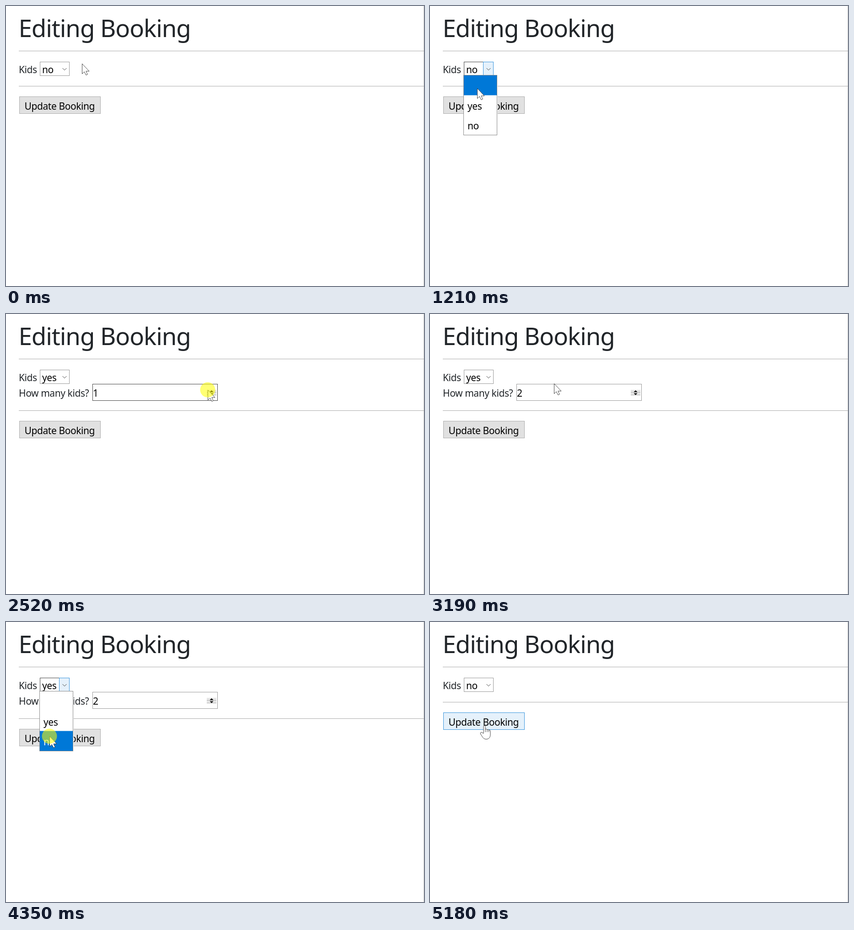
An HTML page with a canvas that plays this animation: 914x613 px, repeating every 6180 ms.

```html
<!DOCTYPE html>
<html lang="en">
<head>
<meta charset="utf-8">
<title>Editing Booking</title>
<style>
  html, body { margin: 0; width: 100%; height: 100%; overflow: hidden; background: #fff; }
  canvas { display: block; }
</style>
</head>
<body>
<canvas id="stage" width="914" height="613"></canvas>
<script>
const ctx = document.getElementById('stage').getContext('2d');
const LOOP = 6180;
const FONT = '"Noto Sans", "Open Sans", sans-serif';
const INK = '#212529', BLUE = '#0078d7', PALE = '#e5f1fb';

// Pointer moves: start, time of last step, steps, target x, target y
const MOVES = [
  [80, 390, 5, 109, 134],
  [810, 1390, 8, 100, 201],
  [1790, 2190, 6, 441, 166],
  [3020, 3430, 6, 100, 138],
  [3670, 3670, 1, 95, 205],
  [3756, 4100, 5, 95, 250],
  [4850, 5180, 5, 118, 226]
];
const CLICKS = [[550, 640], [1470, 1550], [2520, 2600], [2770, 2850], [3510, 3590], [4350, 4430]];
const MENUS = [[640, 1550], [3590, 4430]];
const LIT_ROWS = [[640, 2], [976, 0], [1307, 1], [3670, 0], [3756, 1], [4014, 2]];
const VALUES = [[0, ''], [2520, '1'], [2770, '2']];

const within = (t, [a, b]) => t >= a && t < b;
const latest = (list, t) => list.filter(k => k[0] <= t).pop()[1];
const inBox = (p, x, y, w, h) => p.x >= x && p.x <= x + w && p.y >= y && p.y <= y + h;

function pointerAt(t) {
  let x = 166, y = 126;
  for (const [start, end, steps, tx, ty] of MOVES) {
    if (t < start) break;
    const gap = steps > 1 ? (end - start) / (steps - 1) : 1;
    const p = Math.min(steps, Math.floor((t - start) / gap + 1e-6) + 1) / steps;
    const e = p * p * (3 - 2 * p);
    x += (tx - x) * e;
    y += (ty - y) * e;
  }
  return { x: Math.round(x), y: Math.round(y) };
}

function text(str, x, y, color = '#000', size = 21) {
  ctx.font = `${size}px ${FONT}`;
  ctx.letterSpacing = `${-0.02 * size}px`;
  ctx.fillStyle = color;
  ctx.fillText(str, x, y);
}

function rect(x, y, w, h, fill) {
  ctx.fillStyle = fill;
  ctx.fillRect(x, y, w, h);
}

function box(x, y, w, h, fill, border) {
  rect(x, y, w, h, fill);
  ctx.strokeStyle = border;
  ctx.lineWidth = 1;
  ctx.strokeRect(x + 0.5, y + 0.5, w - 1, h - 1);
}

function poly(points) {
  ctx.beginPath();
  points.forEach(([x, y]) => ctx.lineTo(x, y));
}

function rule(y) {
  rect(28, y, 886, 1, '#aaa');
}

function select(value, active) {
  box(74, 122, 65, 31, '#fff', active ? '#444' : '#999');
  if (active) box(116, 122, 23, 31, PALE, '#3a96dd');
  text(value, 79, 147);
  poly([[123.5, 136], [128, 140.5], [132.5, 136]]);
  ctx.strokeStyle = '#444';
  ctx.lineWidth = 1;
  ctx.stroke();
}

function numberField(value, active) {
  text('How many kids?', 28, 181, INK);
  box(189, 153, 274, 37, '#fff', active ? '#444' : '#999');
  text(value, 190, 181);
  rect(439, 166, 21, 12, '#e6e6e6');
  rect(439, 171, 21, 1, '#b0b0b0');
  rect(439, 177, 21, 1, '#b0b0b0');
  ctx.fillStyle = '#000';
  poly([[445.5, 171], [449.5, 167], [453.5, 171]]);
  ctx.fill();
  poly([[445.5, 173.5], [449.5, 177.5], [453.5, 173.5]]);
  ctx.fill();
}

function menu(lit) {
  rect(73, 151, 75, 132, '#fff');
  rect(73, 152 + lit * 43.3, 74, 43.4, BLUE);
  ctx.strokeStyle = '#8a8a8a';
  ctx.lineWidth = 1;
  ctx.strokeRect(73.5, 151.5, 73, 131);
  ['', 'yes', 'no'].forEach((label, i) =>
    text(label, 82, 184 + i * 43, i === lit ? '#fff' : '#000'));
}

function outline() {
  ctx.fillStyle = '#fff';
  ctx.strokeStyle = '#333';
  ctx.lineWidth = 0.9;
  ctx.lineJoin = 'round';
  ctx.fill();
  ctx.stroke();
}

function arrow() {
  poly([[0.5, 0.5], [0.5, 22.5], [5.2, 18], [9, 25.3], [12.3, 23.8], [8.9, 16.8], [16, 16.8]]);
  ctx.closePath();
  outline();
}

function hand() {
  ctx.beginPath();
  ctx.moveTo(-1, 18);
  ctx.lineTo(-1, 2.5);
  ctx.quadraticCurveTo(1, -1.5, 3, 2.5);
  ctx.lineTo(3, 9);
  ctx.quadraticCurveTo(5.5, 6.5, 7, 10);
  ctx.quadraticCurveTo(9.5, 7.5, 10.7, 11);
  ctx.quadraticCurveTo(13.5, 9, 14, 13);
  ctx.lineTo(14, 20);
  ctx.bezierCurveTo(14, 27, 10.5, 30.5, 5, 30.5);
  ctx.bezierCurveTo(-1, 30.5, -2.5, 27, -7.5, 19);
  ctx.quadraticCurveTo(-8.5, 15, -5, 15.5);
  ctx.closePath();
  outline();
  ctx.beginPath();
  [[3, 9], [7, 10], [10.7, 11]].forEach(([x, y]) => {
    ctx.moveTo(x, y);
    ctx.lineTo(x, 15);
  });
  ctx.stroke();
}

function draw(t) {
  const p = pointerAt(t);
  const hasKids = within(t, [1550, 4430]);
  const open = MENUS.some(m => within(t, m));
  const shift = hasKids ? 36 : 0;
  const onButton = !open && inBox(p, 29, 198 + shift, 178, 38);
  const onSelect = open || within(t, [1550, 1630]) || inBox(p, 74, 122, 65, 31);

  rect(0, 0, 914, 613, '#fff');
  rect(913, 0, 1, 613, '#ccc');
  text('Editing Booking', 27.5, 67.5, INK, 52.8);
  rule(98);
  text('Kids', 28, 147, INK);
  select(hasKids ? 'yes' : 'no', onSelect);
  if (hasKids) numberField(latest(VALUES, t), !open && inBox(p, 189, 153, 274, 37));
  rule(175 + shift);
  box(29, 198 + shift, 178, 38, onButton ? PALE : '#e1e1e1', onButton ? '#3a96dd' : '#adadad');
  text('Update Booking', 40.5, 227 + shift);
  if (open) menu(latest(LIT_ROWS, t));

  ctx.save();
  ctx.translate(p.x, p.y);
  onButton ? hand() : arrow();
  ctx.restore();

  if (CLICKS.some(c => within(t, c))) {
    ctx.fillStyle = 'rgba(255, 255, 0, 0.55)';
    ctx.beginPath();
    ctx.arc(p.x, p.y, 16.5, 0, Math.PI * 2);
    ctx.fill();
  }
}

const begin = performance.now();
function tick() {
  draw((performance.now() - begin) % LOOP);
  requestAnimationFrame(tick);
}
tick();
</script>
</body>
</html>
```
